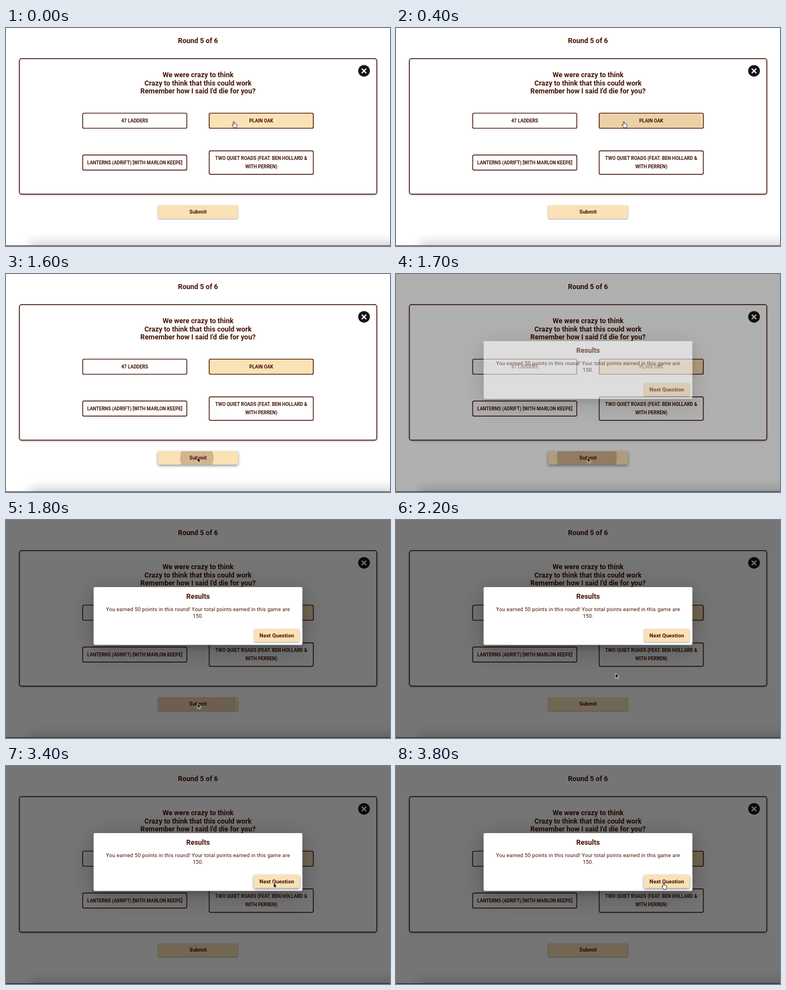
Recreate the animation shown at these times as an HTML page. Size 686x390 px, loop 3900 ms.

```html
<!DOCTYPE html>
<html lang="en">
<head>
<meta charset="utf-8">
<title>Lyric quiz</title>
<style>
  html, body { margin: 0; width: 100%; height: 100%; overflow: hidden; background: #fff; }
  svg { display: block; width: 686px; height: 390px; }
  text { font: 700 12.5px Roboto, "Open Sans", sans-serif; fill: #451302; text-anchor: middle; }
  .option text { font-size: 8.4px; }
  .button text { font-size: 9.7px; }
  .message text { font-size: 9.4px; font-weight: 400; letter-spacing: .18px; }
  .frame { fill: #fff; stroke: #451302; stroke-width: 1.4; }
  .card { filter: drop-shadow(0 1.5px 1.5px rgba(0, 0, 0, .35)); }
  .picked { fill: #fae1b6; }
  .face { fill: #fae1b6; filter: drop-shadow(0 1.2px 1.2px rgba(0, 0, 0, .38)); }
  .hover .face { filter: drop-shadow(0 2px 2.4px rgba(0, 0, 0, .45)); }
  .ripple { fill: #451302; }
  .panel {
    fill: #fff;
    filter: drop-shadow(0 5px 5px rgba(0, 0, 0, .18)) drop-shadow(0 8px 22px rgba(0, 0, 0, .25));
  }
  .edge { filter: blur(9px); opacity: .17; }
</style>
</head>
<body>
<svg viewBox="0 0 686 390">
  <defs>
    <clipPath id="pickClip"><rect x="363" y="152.4" width="186" height="27" rx="2.5"/></clipPath>
    <clipPath id="submitClip"><rect x="271.5" y="317" width="143" height="24" rx="2"/></clipPath>
  </defs>

  <rect class="edge" x="42" y="382" width="720" height="40"/>
  <rect y="388.8" width="686" height="1.2" fill="#555"/>

  <text x="343" y="27">Round 5 of 6</text>
  <rect class="frame card" x="24" y="54.7" width="638.4" height="242.6" rx="4"/>
  <circle cx="639.6" cy="76.7" r="10.5" fill="#151515"/>
  <path d="M635.6 72.7l8 8m0-8l-8 8" stroke="#fff" stroke-width="2.2"/>

  <text x="343" y="88.3">We were crazy to think</text>
  <text x="343" y="102.7">Crazy to think that this could work</text>
  <text x="343" y="117.1">Remember how I said I'd die for you?</text>

  <g class="option">
    <rect class="frame" x="137" y="152.4" width="186" height="27" rx="2.5"/>
    <text x="230" y="169">47 LADDERS</text>
    <rect class="frame picked" x="363" y="152.4" width="186" height="27" rx="2.5"/>
    <text x="456" y="169">PLAIN OAK</text>
    <circle class="ripple" id="pickRipple" cx="408" cy="172" clip-path="url(#pickClip)"/>
    <rect class="frame" x="137" y="227.2" width="186" height="27" rx="2.5"/>
    <text x="230" y="243.8">LANTERNS (ADRIFT) [WITH MARLON KEEPE]</text>
    <rect class="frame" x="363" y="219.7" width="186" height="42" rx="2.5"/>
    <text x="456" y="236.2">TWO QUIET ROADS (FEAT. BEN HOLLARD &amp;</text>
    <text x="456" y="251.2">WITH PERREN)</text>
  </g>

  <g class="button" id="submit">
    <rect class="face" x="271.5" y="317" width="143" height="24" rx="2"/>
    <text x="343" y="332.2">Submit</text>
    <circle class="ripple" id="submitRipple" cx="341" cy="329" clip-path="url(#submitClip)"/>
  </g>

  <rect id="shade" width="686" height="390"/>

  <g id="dialog">
    <rect class="panel" x="156.5" y="120" width="373" height="103.5" rx="2.4"/>
    <text x="343" y="141.3">Results</text>
    <g class="message">
      <text x="343" y="163.4">You earned 50 points in this round! Your total points earned in this game are</text>
      <text x="343" y="174.9">150.</text>
    </g>
    <g class="button" id="next">
      <rect class="face" x="443" y="194.7" width="81.5" height="23.6" rx="2.4"/>
      <text x="483.7" y="210">Next Question</text>
    </g>
  </g>

  <g id="cursor" stroke-linejoin="round">
    <path id="arrow" fill="#000" stroke="#fff" stroke-width=".8"
      d="M0 0V9L2.1 7.1L3.6 10.5L5.1 9.8L3.6 6.6H6.4Z"/>
    <path id="hand" fill="#fff" stroke="#222" stroke-width=".9"
      d="M-1 6.6V1Q0 -.6 1 1V4.2Q2 3.6 2.7 4.6Q3.7 4.1 4.3 5.1Q5.4 4.8 5.5 6V8.2Q5.3 9.4 4.6 10.2V11.6H-.3V10.5L-3 7Q-3.2 5.6 -1.8 6Z"/>
  </g>
</svg>
<script>
  const LOOP = 3900, STEP = 100;
  const el = id => document.getElementById(id);
  const progress = (t, from, to) => Math.min(1, Math.max(0, (t - from) / (to - from)));
  const smooth = p => p * p * (3 - 2 * p);
  const smoother = p => p * p * p * (p * (6 * p - 15) + 10);
  const mix = (a, b, p) => a + (b - a) * p;

  // The pointer rests between these moves
  const home = { x: 407, y: 167 };
  const moves = [
    { from: 400, to: 600, x: 336, y: 252 },
    { from: 600, to: 1100, x: 342, y: 328 },
    { from: 1800, to: 2200, x: 392, y: 274 },
    { from: 3000, to: 3400, x: 478, y: 209 }
  ];

  function pointerAt(t) {
    return moves.reduce((pos, move) => {
      const p = smoother(progress(t, move.from, move.to));
      return { x: mix(pos.x, move.x, p), y: mix(pos.y, move.y, p) };
    }, home);
  }

  // Grows to full size and fades over the last third
  function drawRipple(id, t, pressed, size) {
    const p = progress(t, pressed, pressed + 450);
    el(id).setAttribute("r", size * smooth(p));
    el(id).setAttribute("opacity", .22 * Math.min(1, 3 * (1 - p)));
  }

  function draw(t) {
    const { x, y } = pointerAt(t);
    const pointing = t < 500 || t >= 3600;
    const shown = progress(t, 1600, 1775);

    el("cursor").setAttribute("transform", `translate(${x} ${y})`);
    el("arrow").setAttribute("opacity", pointing ? 0 : 1);
    el("hand").setAttribute("opacity", pointing ? 1 : 0);
    drawRipple("pickRipple", t, 0, 142);
    drawRipple("submitRipple", t, 1400, 72);
    el("shade").setAttribute("opacity", shown * .54);
    el("dialog").setAttribute("opacity", shown);
    el("submit").classList.toggle("hover", t >= 1000 && t < 1800);
    el("next").classList.toggle("hover", t >= 3400);
  }

  const start = performance.now();
  function tick() {
    const t = (performance.now() - start) % LOOP;
    draw(Math.floor(t / STEP) * STEP);
    requestAnimationFrame(tick);
  }
  tick();
</script>
</body>
</html>
```
